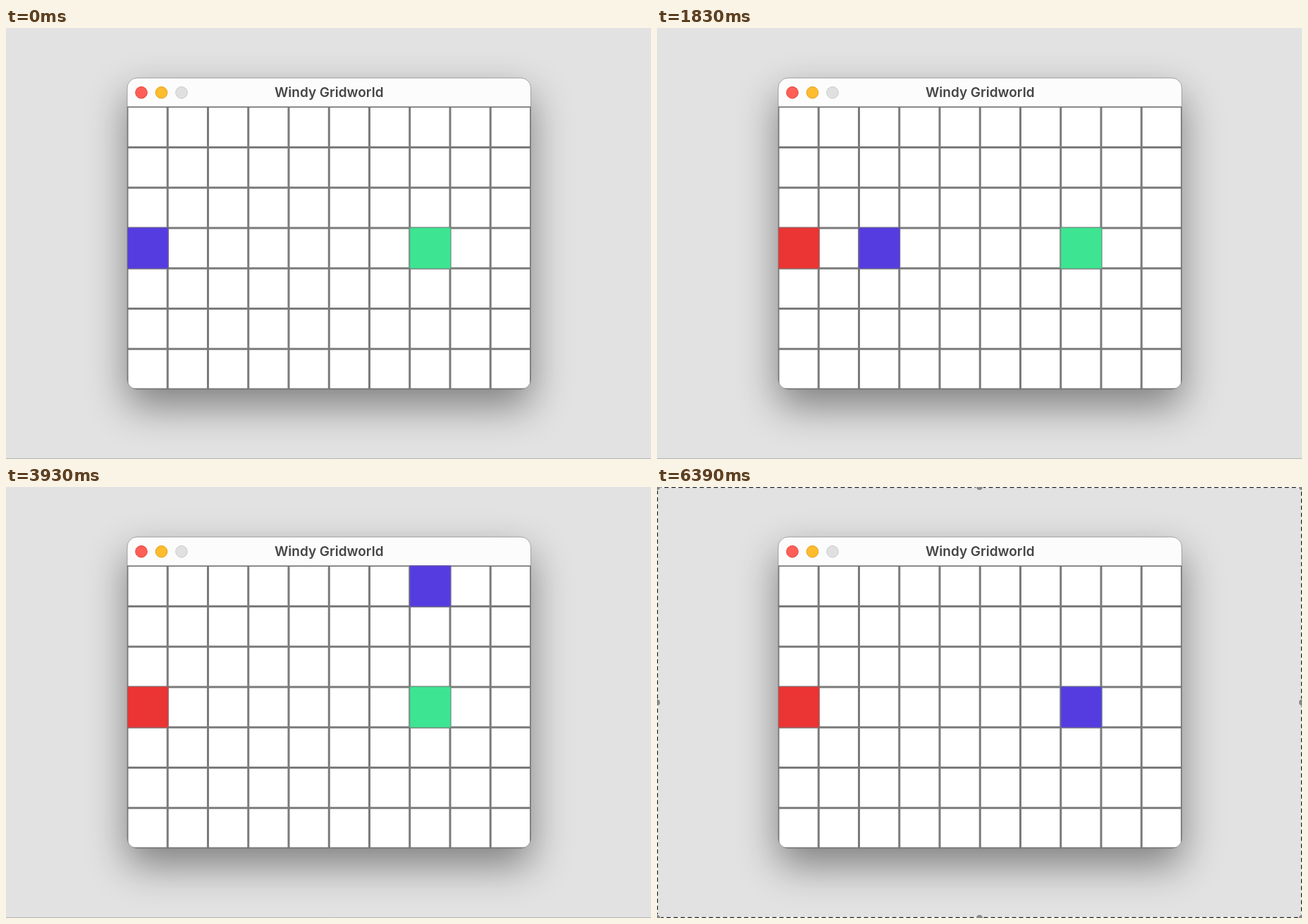
These frames come from a looping animation (915 by 612 pixels, 6.45 s). An HTML page with a canvas:

```html
<!DOCTYPE html>
<html lang="en">
<head>
<meta charset="utf-8">
<title>Windy Gridworld</title>
<style>
  html, body { margin: 0; width: 100%; height: 100%; overflow: hidden; background: #e2e2e2; }
  canvas { display: block; }
</style>
</head>
<body>
<canvas id="stage" width="915" height="612"></canvas>
<script>
const W = 915, H = 612, LOOP = 6450;
const COLS = 10, ROWS = 7, CELL = 57.25, LEFT = 172, TOP = 112;
const WIN = [172, 71, 572.5, 442, 14];
const RED = '#eb3434', GREEN = '#3de592', BLUE = '#553ce0';
const START = [0, 3], GOAL = [7, 3];
const ctx = document.getElementById('stage').getContext('2d');

// Each move is shifted upwards by the wind of the column it leaves.
const wind = [0, 0, 0, 1, 1, 1, 2, 2, 1, 0];
const moves = { R: [1, 0], D: [0, 1], L: [-1, 0] };
const path = [START];
for (const m of 'RRRRRRRRRDDDDLL') {
  const [x, y] = path[path.length - 1], [dx, dy] = moves[m];
  path.push([x + dx, Math.max(0, y + dy - wind[x])]);
}

// One move per 100 ms, with two short hesitations.
function stepAt(t) {
  if (t < 1430) return Math.min(13, Math.floor(t / 100));
  if (t < 4570) return Math.min(44, Math.floor((t - 30) / 100));
  return Math.floor((t - 70) / 100);
}

function line(x1, y1, x2, y2, width, color) {
  ctx.lineWidth = width;
  ctx.strokeStyle = color;
  ctx.beginPath();
  ctx.moveTo(x1, y1);
  ctx.lineTo(x2, y2);
  ctx.stroke();
}

function disc(x, y, r, fill, stroke) {
  ctx.beginPath();
  ctx.arc(x, y, r, 0, Math.PI * 2);
  ctx.fillStyle = fill;
  ctx.fill();
  ctx.lineWidth = 1;
  ctx.strokeStyle = stroke;
  ctx.stroke();
}

function windowShape() {
  ctx.beginPath();
  ctx.roundRect(...WIN);
}

function drawCell([col, row], color) {
  const x = LEFT + col * CELL - 0.3, y = TOP + row * CELL - 0.6, size = CELL + 1.5;
  ctx.fillStyle = color;
  ctx.fillRect(x, y, size, size);
  ctx.lineWidth = 1;
  ctx.strokeStyle = 'rgba(120,120,120,.6)';
  ctx.strokeRect(x + 0.5, y + 0.5, size - 1, size - 1);
}

function drawGrid() {
  const right = LEFT + COLS * CELL, bottom = TOP + ROWS * CELL;
  for (let c = 0; c <= COLS; c++) {
    const x = LEFT + c * CELL;
    line(x, TOP, x, bottom, 3, '#7b7b7b');
  }
  for (let r = 1; r <= ROWS; r++) {
    const y = TOP + r * CELL + 0.2;
    line(LEFT, y, right, y, 3, '#7b7b7b');
  }
  line(LEFT, TOP + 0.2, right, TOP + 0.2, 1.6, '#666');
}

function drawWindow(agent) {
  ctx.save();
  ctx.shadowColor = 'rgba(0,0,0,.44)';
  ctx.shadowBlur = 56;
  ctx.shadowOffsetY = 24;
  ctx.fillStyle = '#fff';
  windowShape();
  ctx.fill();
  ctx.restore();

  ctx.save();
  windowShape();
  ctx.clip();
  ctx.fillStyle = '#fcfcfc';
  ctx.fillRect(LEFT, 71, 573, 41);
  drawGrid();
  drawCell(START, RED);
  drawCell(GOAL, GREEN);
  drawCell(agent, BLUE);
  ctx.restore();

  windowShape();
  ctx.lineWidth = 1;
  ctx.strokeStyle = 'rgba(110,110,110,.6)';
  ctx.stroke();

  disc(192, 91.7, 8.3, '#ff5f57', '#e0443e');
  disc(220.5, 91.7, 8.3, '#febc2e', '#dea123');
  disc(249, 91.7, 8.3, '#e0e0e0', '#cbcbcb');
  ctx.font = '600 19px Inter, sans-serif';
  ctx.textAlign = 'center';
  ctx.fillStyle = '#454545';
  ctx.fillText('Windy Gridworld', 458.2, 97.5);
}

function drawSelection() {
  ctx.lineWidth = 1.5;
  ctx.strokeStyle = '#fff';
  ctx.strokeRect(0.5, 0.5, W - 1, H - 1);
  ctx.strokeStyle = '#222';
  ctx.setLineDash([6, 4]);
  ctx.strokeRect(0.5, 0.5, W - 1, H - 1);
  ctx.setLineDash([]);
  for (const x of [0, W / 2, W])
    for (const y of [0, H / 2, H])
      if (x !== W / 2 || y !== H / 2) disc(x, y, 5, '#888', '#f4f4f4');
}

function draw(now) {
  const t = now % LOOP;
  ctx.fillStyle = '#e2e2e2';
  ctx.fillRect(0, 0, W, H);
  drawWindow(path[stepAt(t) % path.length]);
  if (t >= 6390) drawSelection();
  else line(0, H - 0.5, W, H - 0.5, 1, '#b4b4b4');
}

let begin;
function tick(now) {
  begin ??= now;
  draw(Math.max(0, now - begin));
  requestAnimationFrame(tick);
}
requestAnimationFrame(tick);
</script>
</body>
</html>
```
